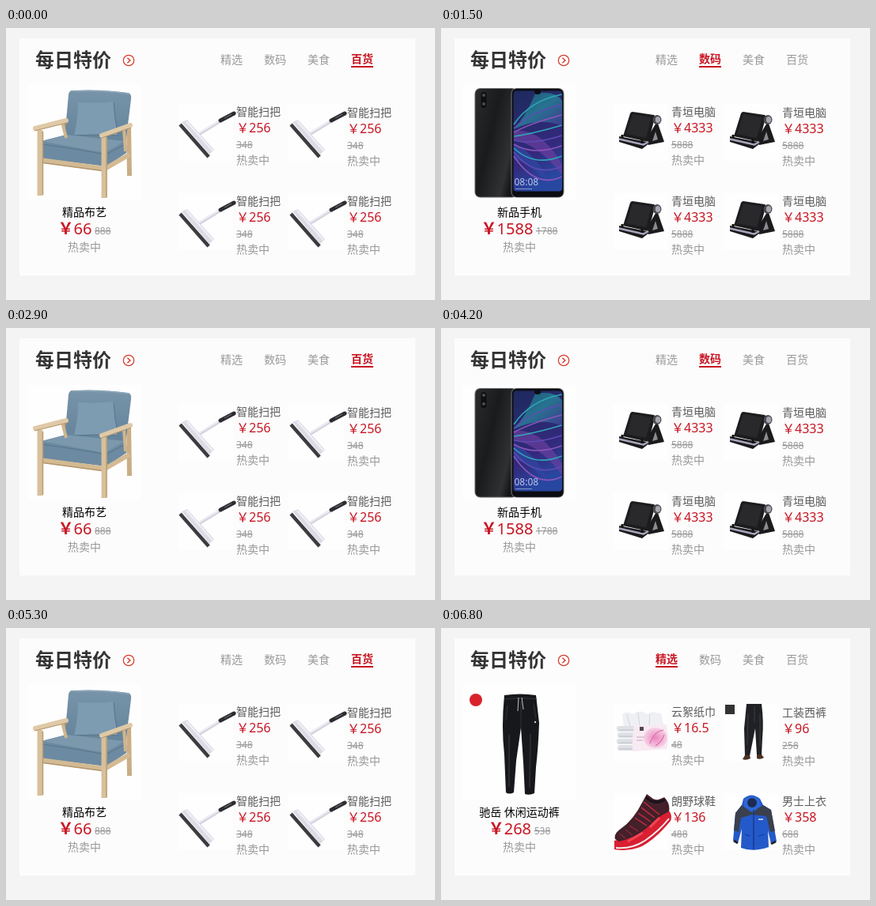
An HTML page that plays this animation: 542x344 px, repeating every 7.7 s.

```html
<!DOCTYPE html>
<html lang="zh-CN">
<head>
<meta charset="utf-8">
<title>每日特价</title>
<style>
html, body { margin: 0; width: 100%; height: 100%; overflow: hidden; background: #f4f4f5; }
svg { display: block; width: 542px; height: 344px; }
text { font-family: "Noto Sans", "Noto Sans CJK SC", "Noto Sans CJK", sans-serif; font-size: 14px; white-space: pre; }
.head { font-size: 24px; font-weight: 700; fill: #333; }
.tab, .hot { fill: #999; }
.tab.on { fill: #c81623; font-weight: 700; }
.name { fill: #5c5c5c; }
.price { font-size: 16px; fill: #c81623; }
.big { font-size: 20px; fill: #c81623; }
.yen { font-weight: 700; }
.old { font-size: 12px; fill: #999; text-decoration: line-through; }
.mid { text-anchor: middle; }
.clock { font-size: 12px; font-weight: 300; fill: #b9c8ee; }
</style>
</head>
<body>
<svg id="stage" viewBox="0 0 542 344">
  <defs>
    <linearGradient id="back" x2="1" y2=".6">
      <stop stop-color="#2a2b2c"/><stop offset=".45" stop-color="#1a1b1c"/><stop offset=".85" stop-color="#303132"/><stop offset="1" stop-color="#151516"/>
    </linearGradient>
    <linearGradient id="screen" x2=".3" y2="1">
      <stop stop-color="#1c2a5c"/><stop offset=".4" stop-color="#2a2a70"/><stop offset=".7" stop-color="#33297c"/><stop offset="1" stop-color="#2847a0"/>
    </linearGradient>
    <linearGradient id="leaf" x2="1" y2="1">
      <stop stop-color="#1f6d8c"/><stop offset=".5" stop-color="#27a3a8"/><stop offset="1" stop-color="#4a3f9c"/>
    </linearGradient>
    <linearGradient id="cloth" x2="0" y2="1">
      <stop stop-color="#7794a9"/><stop offset="1" stop-color="#64829a"/>
    </linearGradient>
    <radialGradient id="bloom">
      <stop stop-color="#ea86bd"/><stop offset="1" stop-color="#f6d3e6"/>
    </radialGradient>
  </defs>
  <rect width="542" height="344" fill="#f4f4f5"/>
  <rect x="17" y="13" width="500" height="300" fill="#fcfcfc"/>
  <text class="head" x="37" y="49">每日特价</text>
  <g id="arrow" fill="none" stroke-width="1.2">
    <circle cx="155" cy="41" r="6.7"/>
    <path d="M153.4 37.8L156.9 41L153.4 44.2" stroke-width="1.4"/>
  </g>
  <g id="tabs"></g>
  <g id="panels"></g>
</svg>
<script>
const LOOP = 7700;
const $ = id => document.getElementById(id);
const txt = (cls, x, y, s) => `<text class="${cls}" x="${x}" y="${y}">${s}</text>`;
const path = (d, fill, extra = '') => `<path d="${d}" fill="${fill}" ${extra}/>`;
const line = (d, color, w, cap = 'butt') =>
  `<path d="${d}" fill="none" stroke="${color}" stroke-width="${w}" stroke-linecap="${cap}" stroke-linejoin="round"/>`;
const rect = (x, y, w, h, fill, rx = 0) =>
  `<rect x="${x}" y="${y}" width="${w}" height="${h}" rx="${rx}" fill="${fill}"/>`;
const oval = (x, y, rx, ry, fill) => `<ellipse cx="${x}" cy="${y}" rx="${rx}" ry="${ry}" fill="${fill}"/>`;

// Large pictures, in stage coordinates
const chair = () =>
  line('M73 116L78 142', '#b89a72', 5) +
  line('M155 124L156 187', '#c9ae87', 6) +
  path('M84 79Q120 77 154 82Q159 83 158 90L151 146L74 140L79 84Q80 79 84 79Z', 'url(#cloth)') +
  line('M84 80Q120 78 156 83', '#8ba5b7', 1.5) +
  path('M91 94Q114 96 136 93Q137 115 142 136Q114 134 86 136Q91 115 91 94Z', '#7d9bb1') +
  line('M86 136Q114 134 142 136Q137 115 136 94', '#58748a', 1) +
  path('M45 143L76 135L150 143Q154 150 152 158L127 175L44 165Q42 152 45 143Z', '#6c8aa1') +
  path('M45 143L76 135L150 143L125 158Z', '#7b98ad') +
  line('M45 147Q90 153 126 160L151 147', '#587489', 1) +
  line('M43 167L125 178L156 160', '#d3ba93', 6) +
  line('M43 170L125 181', '#b2946a', 1.5) +
  line('M71 119L76 139', '#d0b58d', 4) +
  line('M43 129L43 212', '#d8c09b', 7) +
  line('M46.5 131L46.5 211', '#b99c73', 1.5) +
  line('M124 138L124 215', '#d8c09b', 7) +
  line('M127 139L127 214', '#b99c73', 1.5) +
  line('M149 128L151 156', '#d0b58d', 4) +
  line('M37 127L76 117', '#dfc9a7', 6, 'round') +
  line('M121 136L157 123', '#dfc9a7', 6, 'round') +
  line('M36 130L77 120M121 139L158 126', '#b2946a', 1);

// Strands fan out from the left edge of the screen to its right edge
const strands = () => Array.from({ length: 9 }, (_, i) =>
  line(`M92 ${122 + i * 5}Q${112 + i} ${92 + i * 14} 152.5 ${84 + i * 13}`,
    ['#2fa5b4', '#5d4bb4', '#8a55b8'][i % 3], 1.6)).join('');

const phone = () =>
  rect(42.5, 76, 54, 138.5, '#6a6b6d', 7) +
  rect(43.5, 77, 54, 136.5, 'url(#back)', 6) +
  rect(50.5, 81, 7, 20, '#0f0f10', 3.5) +
  oval(54, 85, 2, 2, '#4a4d55') + oval(54, 96, 2, 2, '#4a4d55') +
  rect(88.5, 76, 67, 138.5, '#77787c', 7) +
  rect(89.5, 76.8, 65, 137, '#0c0d12', 6) +
  rect(91.5, 79.5, 61.5, 127, 'url(#screen)', 4) +
  path('M92 128Q107 112 119 83Q145 79 153 92V124Q125 112 92 128Z', 'url(#leaf)', 'opacity=".6"') +
  path('M92 130Q126 126 153 172V186Q122 146 92 142Z', '#6a3fa0', 'opacity=".7"') +
  path('M92 147Q121 158 139 200Q112 170 92 166Z', '#30459f', 'opacity=".8"') +
  strands() +
  oval(122, 81, 4, 3, '#0c0d12') +
  txt('clock', 92.5, 199, '08:08') +
  line('M94 203.5H115', '#8496cc', 1);

const trousers = () =>
  oval(44, 91, 8, 8, '#d8232a') +
  path('M80 85Q100 82 120 85L124 120Q123 150 120 176L118 209Q112 212 106 210L104 170L101 126L95 168L92 208Q86 211 82 208L80 160Q76 125 80 85Z', '#17181b') +
  line('M80 90Q100 87 121 90', '#34363a', 1) +
  line('M98 88L97 105M102 88L104 103', '#d4d4d4', .9) +
  line('M84 98L82 116M117 97L120 115M101 93V126', '#3a3b40', .8) +
  line('M86 135L86 201M113 134L112 202', '#2b2c30', 2) +
  oval(119, 119, 1.2, 1.2, '#cfcfcf');

const cake = () =>
  rect(27, 72, 144, 145, '#f3e4d0') +
  oval(99, 181, 62, 19, '#ffffff') + oval(99, 179, 54, 14, '#ead9c8') +
  path('M54 129V172Q99 195 144 172V129Z', '#e2a862') +
  path('M54 145Q99 168 144 145V155Q99 178 54 155Z', '#fff4e2') +
  oval(99, 129, 45, 17, '#fff8ed') +
  [72, 90, 108, 126].map((x, i) => oval(x, 122 + i % 2 * 8, 9, 9, '#cf3034')).join('');

// Small pictures, relative to a 70 px slot
const broom = () =>
  line('M24 40L55 21', '#d5d3de', 4) +
  line('M25 38L55 20', '#eeedf4', 1.5) +
  line('M54 21L71 12', '#2c2d31', 5, 'round') +
  line('M59 18L68 13', '#77787e', 1) +
  path('M5 23L12 20L46 58L40 64Z', '#dddbe5') +
  line('M11 22L44 59', '#f1f0f6', 2) +
  line('M3 26L39 67', '#3c3c40', 4.5);

const stand = () =>
  path('M56 22L65 48L45 52L43 44Z', '#1b1b1d') +
  path('M54 35L57 45L50 47Z', '#8b8b90') +
  path('M22 12Q23 10 25 10L52 14Q54 15 53 18L45 48L13 41Z', '#1c1c1e') +
  path('M25 13L49 17L42 43L17 38Z', '#29292b') +
  path('M8 41L43 48L46 47V50L37 57L8 48Z', '#1a1a1c') +
  line('M8 44.5L39 51.5L45 48', '#aaa5bc', 2.6) +
  line('M12 43V39M37 50V45', '#111', 3) +
  oval(56, 20, 5.5, 6, '#4a4a50') + oval(57, 20, 3.2, 4, '#a5a5b0');

const tissue = () =>
  path('M12 13Q19 8 25 13L31 10Q38 8 43 13L50 10L61 12L65 30L14 32Z', '#eff0f3') +
  line('M18 13L22 29M32 11L34 28M47 13L46 27', '#d3d5dc', 1) +
  [0, 1, 2, 3].map(i => rect(5 + i % 2, 28 + i * 8, 27, 7, '#dfe1e6', 3) +
    line(`M8 ${33 + i * 8}H28`, '#bcc0c9', 1)).join('') +
  path('M27 28L68 26Q71 43 69 57L25 60Q24 43 27 28Z', '#f8eaf2') +
  oval(54, 43, 15, 13, 'url(#bloom)') +
  line('M47 50Q53 34 64 33M54 53Q62 48 65 39', '#dc6dab', 1.2) +
  rect(34, 29, 5, 5, '#51494f') +
  line('M30 42H40M30 46H38', '#c5a8b8', 1);

const suit = () =>
  rect(2, 1, 12, 12, '#333') +
  path('M29 0H48Q51 24 49 43L48 65H42L40 31L33 66H27L26 31Z', '#202124') +
  line('M39 3V24M31 13L30 52M46 12L46 53', '#3d3e42', 1) +
  path('M27 65H33L34 69Q28 72 24 70Z', '#4a3024') + path('M42 64H48L51 68Q46 71 42 69Z', '#4a3024');

const shoe = () =>
  path('M2 60Q23 55 42 37Q56 24 70 21Q76 27 73 35Q55 57 37 67Q20 74 2 71Z', '#d91f32') +
  line('M4 69Q25 71 42 59T71 32', '#f1eff0', 2) +
  path('M3 58Q1 51 10 45Q26 34 37 12L43 1L51 7Q56 10 65 5Q73 13 71 23Q56 30 44 43Q29 56 8 61Z', '#43202a') +
  line('M28 31L43 41M32 25L48 36M36 18L53 31M39 11L59 27', '#c52a3d', 1.5) +
  line('M9 51L16 57M16 46L25 53M21 41L32 48', '#8e2536', 1.5) +
  line('M42 5Q53 16 66 8', '#17141a', 3) +
  line('M19 61L38 50M47 43L59 31', '#f04655', 3);

const jacket = () =>
  path('M25 7Q35 -2 46 7L50 15L60 21L67 61L60 64L56 47L57 68Q37 75 22 69L23 45L18 63L12 60L15 25L23 15Z', '#2459c9') +
  path('M23 15L35 24L50 15L60 21L65 48L59 49L54 29L36 27L22 31L19 49L13 47L15 25Z', '#3a404d') +
  path('M26 8Q36 0 45 8L47 16L37 24L26 17Z', '#2e66d8') +
  oval(36, 12, 6, 6, '#1d2c52') +
  line('M38 21V71', '#153b8f', 1.5) +
  line('M27 52L33 54M44 54L51 52', '#143c91', 1.2) +
  line('M44 33H50', '#e5e9f2', 1.5) +
  line('M13 60L18 63M60 64L66 61', '#20242d', 3);

const fruit = () =>
  rect(0, 0, 68, 69, '#f7efdf') +
  path('M9 34H60L54 61H15Z', '#c08a50') +
  oval(23, 30, 11, 11, '#e58a2f') + oval(43, 28, 12, 12, '#cc3a35') + oval(33, 36, 10, 9, '#8fb443') +
  path('M9 40H60L54 61H15Z', '#d1a066');

const same = (art, name, price, old) => Array(4).fill([art, name, price, old]);
const DATA = [
  { tab: '精选', art: trousers, name: '驰岳 休闲运动裤', price: 268, old: 538, items: [
    [tissue, '云絮纸巾', '16.5', 48], [suit, '工装西裤', 96, 258],
    [shoe, '朗野球鞋', 136, 488], [jacket, '男士上衣', 358, 688]] },
  { tab: '数码', art: phone, name: '新品手机', price: 1588, old: 1788, items: same(stand, '青垣电脑', 4333, 5888) },
  { tab: '美食', art: cake, name: '美味蛋糕', price: 68, old: 128, items: same(fruit, '鲜果礼盒', 99, 158) },
  { tab: '百货', art: chair, name: '精品布艺', price: 66, old: 888, items: same(broom, '智能扫把', 256, 348) },
];

const item = ([art, name, price, old], i) => {
  const x = 217 + i % 2 * 140, y = 96 + (i >> 1) * 113, dy = i === 1 ? 1 : 0;
  return `<g transform="translate(${x} ${y})">${rect(0, 0, 70, 72, '#fefefe')}${art()}` +
    `<g transform="translate(74 ${dy})">${txt('name', 0, 15, name)}${txt('price', 0, 36, '￥' + price)}` +
    `${txt('old', 0, 56, old)}${txt('hot', 0, 76, '热卖中')}</g></g>`;
};

const panel = d => `<g>${rect(27, 72, 144, 145, '#fefefe')}${d.art()}` +
  txt('mid', 99, 238, d.name) +
  `<text class="mid" x="99" y="261"><tspan class="big yen">￥</tspan><tspan class="big">${d.price}</tspan> <tspan class="old">${d.old}</tspan></text>` +
  txt('hot mid', 99, 282, '热卖中') + d.items.map(item).join('') + '</g>';

$('tabs').innerHTML = DATA.map((d, i) =>
  `<g>${txt('tab', 271 + i * 55, 45, d.tab)}${rect(271 + i * 55, 48, 28, 2, '#c81623')}</g>`).join('');
$('panels').innerHTML = DATA.map(panel).join('');

const tabs = [...$('tabs').children], panels = [...$('panels').children];
const [ring, chevron] = $('arrow').children;

// [start ms, tab index]
const SWITCHES = [[0, 3], [200, 0], [1500, 1], [2300, 2], [2900, 3], [4200, 1],
  [4400, 0], [4700, 1], [4900, 2], [5300, 3], [5700, 0]];

const hoverAt = t => t < 6100 || t >= 6800 ? 0 : t < 6200 ? .5 : 1;

function draw(t) {
  const active = SWITCHES.filter(s => s[0] <= t).pop()[1];
  DATA.forEach((_, i) => {
    const on = i === active, [label, bar] = tabs[i].children;
    label.setAttribute('class', on ? 'tab on' : 'tab');
    label.setAttribute('y', on ? 44 : 45);
    bar.style.display = panels[i].style.display = on ? '' : 'none';
  });
  const h = hoverAt(t), mix = (a, b) => Math.round(a + (b - a) * h);
  ring.setAttribute('stroke', '#d8392b');
  ring.setAttribute('fill', `rgba(216,57,43,${h})`);
  chevron.setAttribute('stroke', `rgb(${mix(216, 255)},${mix(57, 255)},${mix(43, 255)})`);
}

let start;
function tick(now) {
  start ??= now;
  draw((now - start) % LOOP);
  requestAnimationFrame(tick);
}
draw(0);
requestAnimationFrame(tick);
</script>
</body>
</html>
```
